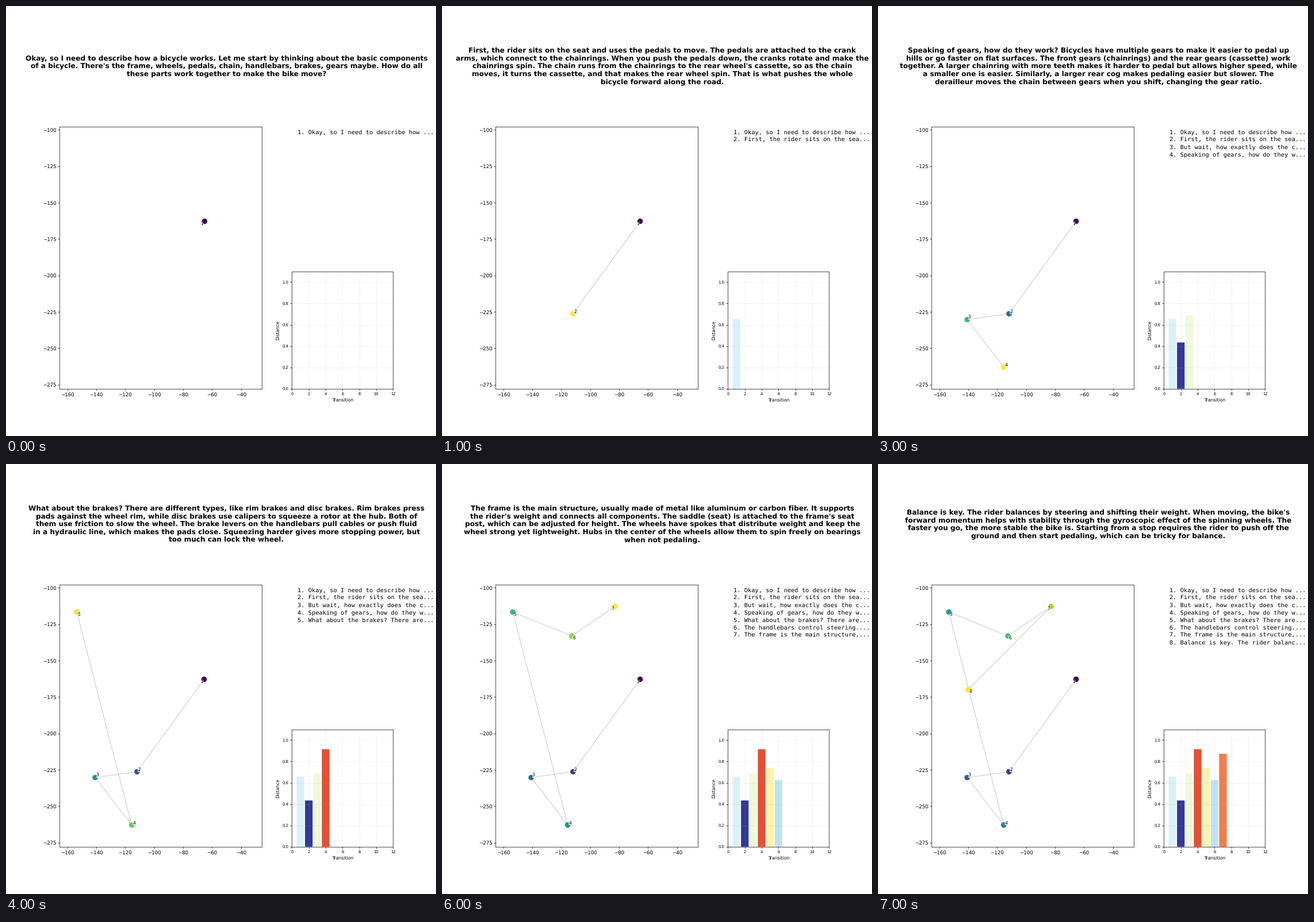
Animation of 748x748 px, one loop 8000 ms. Source, as a matplotlib script:

```python
import numpy as np
import matplotlib.pyplot as plt
from matplotlib.animation import FuncAnimation

SIZE = 748
INCHES = 12

THOUGHTS = [
    "Okay, so I need to describe how a bicycle works. Let me start by thinking about the basic components\n"
    "of a bicycle. There's the frame, wheels, pedals, chain, handlebars, brakes, gears maybe. How do all\n"
    "these parts work together to make the bike move?",

    "First, the rider sits on the seat and uses the pedals to move. The pedals are attached to the crank\n"
    "arms, which connect to the chainrings. When you push the pedals down, the cranks rotate and make the\n"
    "chainrings spin. The chain runs from the chainrings to the rear wheel's cassette, so as the chain\n"
    "moves, it turns the cassette, and that makes the rear wheel spin. That is what pushes the whole\n"
    "bicycle forward along the road.",

    "But wait, how exactly does the chain transfer the motion? The chain is made of links that fit into\n"
    "the teeth of the chainrings and the cassette. So when the pedals turn the chainring, the chain\n"
    "moves, pulling the cassette and thus the rear wheel. That's the drivetrain, right? The drivetrain\n"
    "includes the pedals, crankset, chain, cassette, and derailleurs if there are gears.",

    "Speaking of gears, how do they work? Bicycles have multiple gears to make it easier to pedal up\n"
    "hills or go faster on flat surfaces. The front gears (chainrings) and the rear gears (cassette) work\n"
    "together. A larger chainring with more teeth makes it harder to pedal but allows higher speed, while\n"
    "a smaller one is easier. Similarly, a larger rear cog makes pedaling easier but slower. The\n"
    "derailleur moves the chain between gears when you shift, changing the gear ratio.",

    "What about the brakes? There are different types, like rim brakes and disc brakes. Rim brakes press\n"
    "pads against the wheel rim, while disc brakes use calipers to squeeze a rotor at the hub. Both of\n"
    "them use friction to slow the wheel. The brake levers on the handlebars pull cables or push fluid\n"
    "in a hydraulic line, which makes the pads close. Squeezing harder gives more stopping power, but\n"
    "too much can lock the wheel.",

    "The handlebars control steering. Turning the handlebars rotates the front wheel, changing the\n"
    "direction of the bike. The headset at the front of the frame allows the handlebars and fork to\n"
    "rotate smoothly. The fork holds the front wheel and connects it to the frame. The tires have treads\n"
    "for grip, and they're inflated with air to absorb shocks and maintain traction.",

    "The frame is the main structure, usually made of metal like aluminum or carbon fiber. It supports\n"
    "the rider's weight and connects all components. The saddle (seat) is attached to the frame's seat\n"
    "post, which can be adjusted for height. The wheels have spokes that distribute weight and keep the\n"
    "wheel strong yet lightweight. Hubs in the center of the wheels allow them to spin freely on bearings\n"
    "when not pedaling.",

    "Balance is key. The rider balances by steering and shifting their weight. When moving, the bike's\n"
    "forward momentum helps with stability through the gyroscopic effect of the spinning wheels. The\n"
    "faster you go, the more stable the bike is. Starting from a stop requires the rider to push off the\n"
    "ground and then start pedaling, which can be tricky for balance.",
]

POINTS = np.array([
    (-65.5, -162.8), (-111.8, -226.3), (-140.7, -230.3), (-115.5, -262.9),
    (-153.4, -116.6), (-112.7, -133.0), (-82.8, -112.8), (-140.0, -169.9),
])
# Side of its point on which each number sits: (x, y), y up.
SIDES = [(-1, -1), (1, 1), (1, 1), (1, 1), (1, -1), (1, -1), (-1, -1), (1, -1)]

DISTANCES = [0.656, 0.434, 0.689, 0.915, 0.740, 0.626, 0.872]

plt.rcParams.update({"font.family": "DejaVu Sans", "text.hinting": "no_hinting"})
fig = plt.figure(figsize=(INCHES, INCHES), dpi=SIZE / INCHES, facecolor="white")


def axes_at(left, top, right, bottom):
    """Axes from pixel edges, y measured downwards."""
    return fig.add_axes([left / SIZE, 1 - bottom / SIZE,
                         (right - left) / SIZE, (bottom - top) / SIZE])


def text_at(x, y, text, **style):
    return fig.text(x / SIZE, 1 - y / SIZE, text, **style)


# Path of thoughts
path_ax = axes_at(93.45, 210.1, 444.84, 665.72)
path_ax.set(xlim=(-165.2, -25.7), ylim=(-277.8, -97.9),
            xticks=range(-160, -39, 20), yticks=range(-275, -99, 25))
path, = path_ax.plot([], [], color="gray", alpha=0.5, lw=1, zorder=1)
dots = path_ax.scatter([], [], s=100, zorder=2)

numbers = []
for k, (point, (sx, sy)) in enumerate(zip(POINTS, SIDES), 1):
    numbers.append(path_ax.annotate(
        str(k), point, xytext=(1.5 * sx, -0.5), textcoords="offset pixels", fontsize=9,
        ha="left" if sx > 0 else "right", va="bottom" if sy > 0 else "top",
        bbox=dict(boxstyle="square,pad=0", fc="white", ec="none", alpha=0.7),
        zorder=3))

# Distance bars
bar_ax = axes_at(497.45, 461.9, 673.2, 665.72)
shades = plt.get_cmap("RdYlBu_r")(plt.Normalize(min(DISTANCES), 1)(DISTANCES))
bars = bar_ax.bar(range(1, len(DISTANCES) + 1), DISTANCES, width=0.9,
                  color=shades, snap=False)
bar_ax.set(xlim=(0, 12), ylim=(0, 1.1),
           xticks=range(0, 13, 2), yticks=np.arange(6) / 5)
bar_ax.set_xlabel("Transition", fontsize=9)
bar_ax.set_ylabel("Distance", fontsize=9)
bar_ax.tick_params(labelsize=8)
bar_ax.grid(True, linestyle="--", alpha=0.3)

# Headline and running list
headline = text_at(383.35, 104.5, "", fontsize=14, fontweight="bold",
                   linespacing=1.215, ha="center", va="center")
entries = [text_at(507.1, 222.8 + 13 * k, f"{k + 1}. {thought[:32]}...",
                   fontsize=12, family="DejaVu Sans Mono", va="baseline")
           for k, thought in enumerate(THOUGHTS)]


def show_first(artists, count):
    for k, artist in enumerate(artists):
        artist.set_visible(k < count)


def update(step):
    count = step + 1
    headline.set_text(THOUGHTS[step])
    path.set_data(POINTS[:count, 0], POINTS[:count, 1])
    dots.set_offsets(POINTS[:count])
    dots.set_color(plt.get_cmap("viridis")(np.linspace(0, 1, count)))
    show_first(numbers, count)
    show_first(entries, count)
    show_first(bars, step)
    return []


anim = FuncAnimation(fig, update, frames=len(THOUGHTS), interval=1000,
                     repeat=True, repeat_delay=0, blit=False)
plt.show()
```
